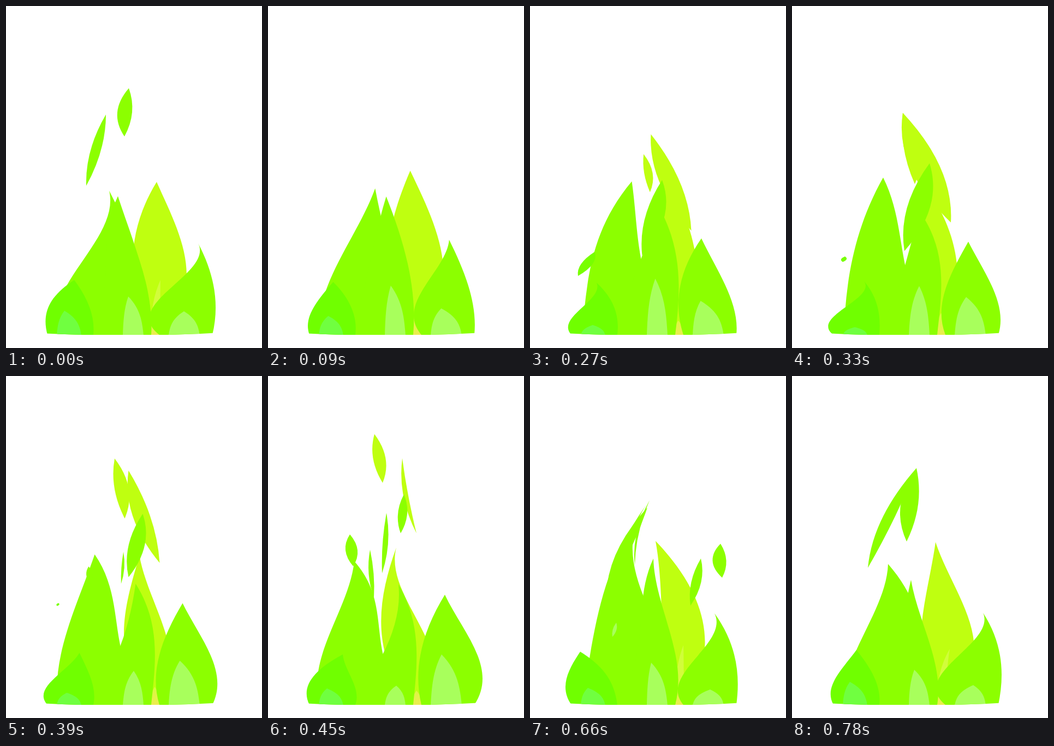
Animation of 469 by 624 pixels, one loop 0.81 s. Source, as an HTML page:

```html
<!DOCTYPE html>
<html lang="en">
<head>
<meta charset="utf-8">
<title>Green flame</title>
<style>
  html, body { margin: 0; width: 100%; height: 100%; overflow: hidden; background: #fff; }
  svg { display: block; width: 100vw; height: 100vh; }
</style>
</head>
<body>
<svg viewBox="0 0 469 624" preserveAspectRatio="none">
  <defs>
    <linearGradient id="glow" gradientUnits="userSpaceOnUse" x1="0" y1="490" x2="0" y2="600">
      <stop offset="0" stop-color="#cdff38"/>
      <stop offset=".7" stop-color="#d8f93e"/>
      <stop offset="1" stop-color="#ecec50"/>
    </linearGradient>
    <clipPath id="ground"><path d="M0,0H469V591Q228,610 0,593Z"/></clipPath>
  </defs>
  <g id="fire" clip-path="url(#ground)"></g>
</svg>
<script>
const LOOP = 810, STEP = 30, BASE = 600;
const BEATS = [0, 210, 330, 450, 570, 660, 780, LOOP];
const LIFE = 90, RISE = 0.75, SHRINK = 0.7;   // how loose wisps appear and burn out
const LIME = '#bfff10', GREEN = '#8cff00', LEAF = '#70ff00', PALE = '#a8ff5c', MINT = '#70ff40';
const fire = document.getElementById('fire');
const layers = [];

const mix = (a, b, u) => a + (b - a) * u;
const numbers = text => text.split(' ').map(Number);

function addLayer(fill, shape) {
  const path = document.createElementNS('http://www.w3.org/2000/svg', 'path');
  path.setAttribute('fill', fill);
  fire.appendChild(path);
  layers.push({ path, shape });
}

// Pose between the two keys around t
function poseAt(times, poses, t) {
  const i = Math.max(0, times.findLastIndex((k, n) => k <= t && n < times.length - 1));
  const u = (t - times[i]) / (times[i + 1] - times[i]);
  return poses[i].map((v, k) => mix(v, poses[i + 1][k], u));
}

// Flame rooted at two feet; each side is a cubic through its x at 1/3 and 2/3 of the height
function tonguePath(l, r, [x, y, l1, l2, r1, r2]) {
  const low = (f, p, q) => (-5 * f + 18 * p - 9 * q + 2 * x) / 6;
  const high = (f, p, q) => (2 * f - 9 * p + 18 * q - 5 * x) / 6;
  const y1 = mix(BASE, y, 1 / 3), y2 = mix(BASE, y, 2 / 3);
  return `M${l},${BASE}C${low(l, l1, l2)},${y1} ${high(l, l1, l2)},${y2} ${x},${y}` +
    `C${high(r, r1, r2)},${y2} ${low(r, r1, r2)},${y1} ${r},${BASE}Z`;
}

// Poses, one per beat: tip x, tip y, left x at 1/3 and 2/3, right x at 1/3 and 2/3
function tongue(fill, l, r, ...keys) {
  const poses = [...keys, keys[0]].map(numbers);
  addLayer(fill, t => tonguePath(l, r, poseAt(BEATS, poses, t)));
}

// Plump little flame that only needs its tips
function petal(fill, l, r, ...tips) {
  tongue(fill, l, r, ...tips.map(tip => {
    const x = numbers(tip)[0], side = f => `${mix(f, x, 0.12)} ${mix(f, x, 0.4)}`;
    return `${tip} ${side(l)} ${side(r)}`;
  }));
}

// Loose leaf; poses: time, tail x y, tip x y, left and right bulge.
// It grows while rising into its first pose and burns out after its last.
function wisp(fill, ...keys) {
  const rows = keys.map(numbers), times = rows.map(k => k[0]), poses = rows.map(k => k.slice(1));
  const first = times[0], last = times[times.length - 1];
  addLayer(fill, now => {
    const t = now < first - LIFE ? now + LOOP : now;
    if (t < first - LIFE || t >= last + LIFE) return '';
    const held = Math.min(Math.max(t, first), last), away = t - held;
    const [x0, y0, x1, y1, left, right] = times.length > 1 ? poseAt(times, poses, held) : poses[0];
    const cx = (x0 + x1) / 2, cy = (y0 + y1) / 2;
    const size = 1 - SHRINK * Math.abs(away) / LIFE;
    const at = (x, y) => `${cx + (x - cx) * size},${cy + (y - cy) * size - RISE * away}`;
    return `M${at(x0, y0)}Q${at(cx + 2 * left, cy)} ${at(x1, y1)}Q${at(cx + 2 * right, cy)} ${at(x0, y0)}Z`;
  });
}

// Back flame
tongue(LIME, 262, 284,
  '276 321 235 238 330 316', '240 273 205 212 310 289', '254 343 225 232 303 294',
  '235 313 214 210 300 254', '220 327 211 209 312 270', '230 301 245 240 320 301',
  '263 303 236 245 334 307');
wisp(LIME, '210 300 425 240 273 -12 8', '330 291 395 203 195 -30 25', '450 272 287 246 150 -11 -2');
wisp(LIME, '330 225 325 203 195 -9 20', '450 210 195 195 106 -10 13');
petal('url(#glow)', 264, 282,
  '283 500', '270 588', '273 560', '272 574', '275 514', '281 491', '289 498');

// Right flame
tongue(GREEN, 281, 378,
  '352 433 273 330 384 375', '305 418 269 273 363 335', '323 430 275 293 378 354',
  '324 399 276 291 391 362', '328 437 275 290 383 376', '338 433 281 325 380 368',
  '350 432 274 328 384 376');
wisp(GREEN, '570 290 478 357 348 -26 -4', '660 294 419 313 333 -8 10');
wisp(GREEN, '570 346 457 357 348 -18 6', '660 352 368 349 306 -16 9');

// Main flame, two tongues
tongue(GREEN, 95, 266,
  '189 337 110 167 258 230', '206 327 108 135 215 197', '167 313 103 125 215 196',
  '158 338 98 132 212 199', '188 317 108 136 215 210', '219 227 116 150 240 192',
  '176 343 112 152 250 228');
tongue(GREEN, 150, 266,
  '205 347 180 185 258 234', '232 348 170 208 272 262', '236 378 190 213 273 268',
  '239 380 200 232 272 267', '251 391 190 236 273 268', '226 333 195 205 267 243',
  '218 372 190 205 262 239');
wisp(GREEN, '210 205 463 232 348 -8 20', '330 206 447 252 287 -18 24', '450 243 287 249 216 -8 9');
wisp(GREEN, '450 209 360 217 250 -3 7');
wisp(GREEN, '450 194 405 187 317 -6 3');
wisp(GREEN, '450 156 347 150 289 -11 11');
wisp(GREEN, '660 140 400 215 240 -18 5', '780 139 350 228 168 -18 4', '810 147 328 183 198 -10 9');
wisp(GREEN, '660 192 345 219 227 -10 -6', '780 210 302 228 168 -20 12', '810 217 238 225 150 -17 10');

// Left flame
tongue(LEAF, 76, 160,
  '125 500 73 87 158 146', '112 508 79 101 159 144', '132 502 76 118 160 152',
  '137 508 72 92 160 147', '106 488 71 88 148 125', '92 503 65 73 152 132',
  '118 500 73 92 157 142');
wisp('#78ff00', '210 83 518 140 440 -14 18', '330 93 467 97 457 -5 5');

// Inner lights
petal(MINT, 93, 138,
  '107 556', '115 578', '115 586', '108 570', '100 570', '106 569', '106 558');
petal(PALE, 214, 252,
  '224 530', '226 484', '233 511', '235 565', '233 543', '222 523', '224 536');
petal(PALE, 298, 355,
  '326 557', '306 545', '319 531', '318 508', '325 530', '330 572', '332 564');
wisp(PALE, '570 162 483 155 462 -1 1', '660 151 476 158 450 -3 4');

function draw(ms) {
  const t = Math.floor((ms % LOOP) / STEP) * STEP;
  for (const { path, shape } of layers) path.setAttribute('d', shape(t));
}

const began = performance.now();
function tick() {
  draw(performance.now() - began);
  requestAnimationFrame(tick);
}
tick();
</script>
</body>
</html>
```
